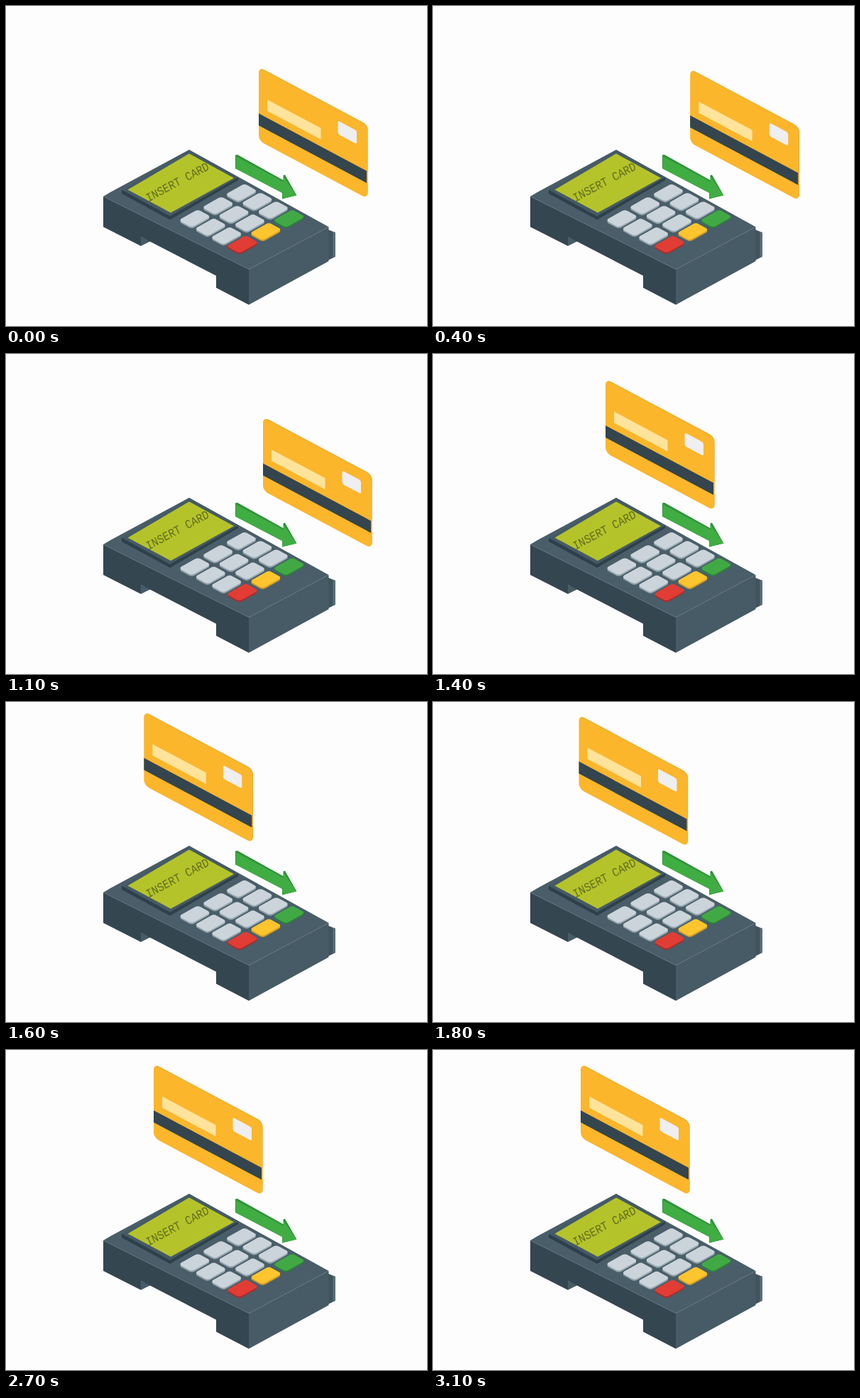
An HTML page for the animation above (3200 ms loop, 593 by 452 pixels).

```html
<!DOCTYPE html>
<html lang="en">
<head>
<meta charset="utf-8">
<title>Insert card</title>
<style>
html, body { margin: 0; width: 100%; height: 100%; overflow: hidden; background: #fefdfe; }
svg { display: block; width: 100%; height: 100%; filter: blur(.55px); }
text { font: 15px "Liberation Mono", monospace; fill: #5f6e1f; }
</style>
</head>
<body>
<svg viewBox="0 0 593 452">
  <g id="body">
    <path fill="#40545e" d="M454 316L464 320V354L454 359Z"/>
    <path fill="#5a6f79" d="M460.5 319L464 320V354L460.5 355.5Z"/>
    <path fill="#475c67" d="M190 326L204 332L190 339Z"/>
    <path fill="#344650" d="M137 269L342 372V422L296 398V381L190 326V339L137 312Z"/>
    <path fill="#465b66" d="M342 372L454.5 312V360.5L342 422Z"/>
    <path fill="#495e69" d="M137 269L147 263L258 203L454.5 312L342 372Z"/>
  </g>
  <g id="screen">
    <path fill="#2e404a" d="M163 259.5L231 296L327 242V246L231 302L163 265Z"/>
    <path fill="#455a65" d="M163 259.5L258 203.5L327 242L231 297Z"/>
    <path fill="#b5c32a" d="M171.5 259.5L258 208.5L321 243L232 292Z"/>
    <text transform="matrix(.875 -.47 .5 1.03 200.5 277)">INSERT CARD</text>
  </g>
  <g id="keys"></g>
  <g id="arrow">
    <path fill="#2f923c" d="M323 210.5L326 210L390.5 246V239L393 238.5L409.5 267.5L389 272.5V264L323 229.5Z"/>
    <path fill="#40ad43" d="M324 212.5L391 248.5V241L409 267.5L389.5 272V264L323.5 229.5Z"/>
  </g>
  <g id="card">
    <g transform="matrix(1 .534 0 1 208 20.2)">
      <rect x=".7" y="-1" width="153" height="103" rx="7" fill="#e6a534"/>
      <rect width="153" height="103.5" rx="7" fill="#fbb62b"/>
      <rect y="65" width="152" height="17" fill="#34454e"/>
      <rect x="12" y="39" width="75.5" height="16" fill="#fee39a"/>
      <rect x="111.5" y="15.5" width="26.5" height="19" rx="2.5" fill="#efeef0"/>
    </g>
  </g>
</svg>
<script>
const LOOP = 3200, STEP = 100, SLOPE = 0.45, REST = 154;
const card = document.getElementById('card');
const keys = document.getElementById('keys');

function addKey(x, y, face, side) {
  const rect = (dy, fill) =>
    `<rect x="-10.5" y="-15.5" width="21" height="31" rx="4.5" fill="${fill}"
      transform="matrix(.876 .483 -.871 .491 ${x} ${y + dy})"/>`;
  keys.innerHTML += rect(1.6, side) + rect(-0.6, face);
}

const lastRow = [['#40a944', '#2c7d3a'], ['#fcc52d', '#cf9a2b'], ['#e13d34', '#a92c2d']];
for (let col = 0; col < 3; col++) {
  for (let row = 0; row < 4; row++) {
    const [face, side] = row < 3 ? ['#cbd4da', '#93a4ae'] : lastRow[col];
    addKey(331.5 + row * 22.4 - col * 32.8, 264.2 + row * 12.2 + col * 18.2, face, side);
  }
}

// Horizontal shift of the card from its left resting place.
function shift(t) {
  if (t < 100) return 148;
  if (t < 1300) return REST + 3 * Math.exp(-(t - 100) / 110);
  if (t < 1400) return REST - 119 * (t - 1300) / 100;
  if (t < 1500) return 35 - 67 * (t - 1400) / 100;
  return -32 * Math.exp(-(t - 1500) / 118);
}

function draw(now) {
  const t = Math.floor((now % LOOP) / STEP) * STEP;
  const x = shift(t);
  card.setAttribute('transform', `translate(${x.toFixed(2)} ${(x * SLOPE).toFixed(2)})`);
}

let start;
function tick(now) {
  start ??= now;
  draw(now - start);
  requestAnimationFrame(tick);
}
draw(0);
requestAnimationFrame(tick);
</script>
</body>
</html>
```
